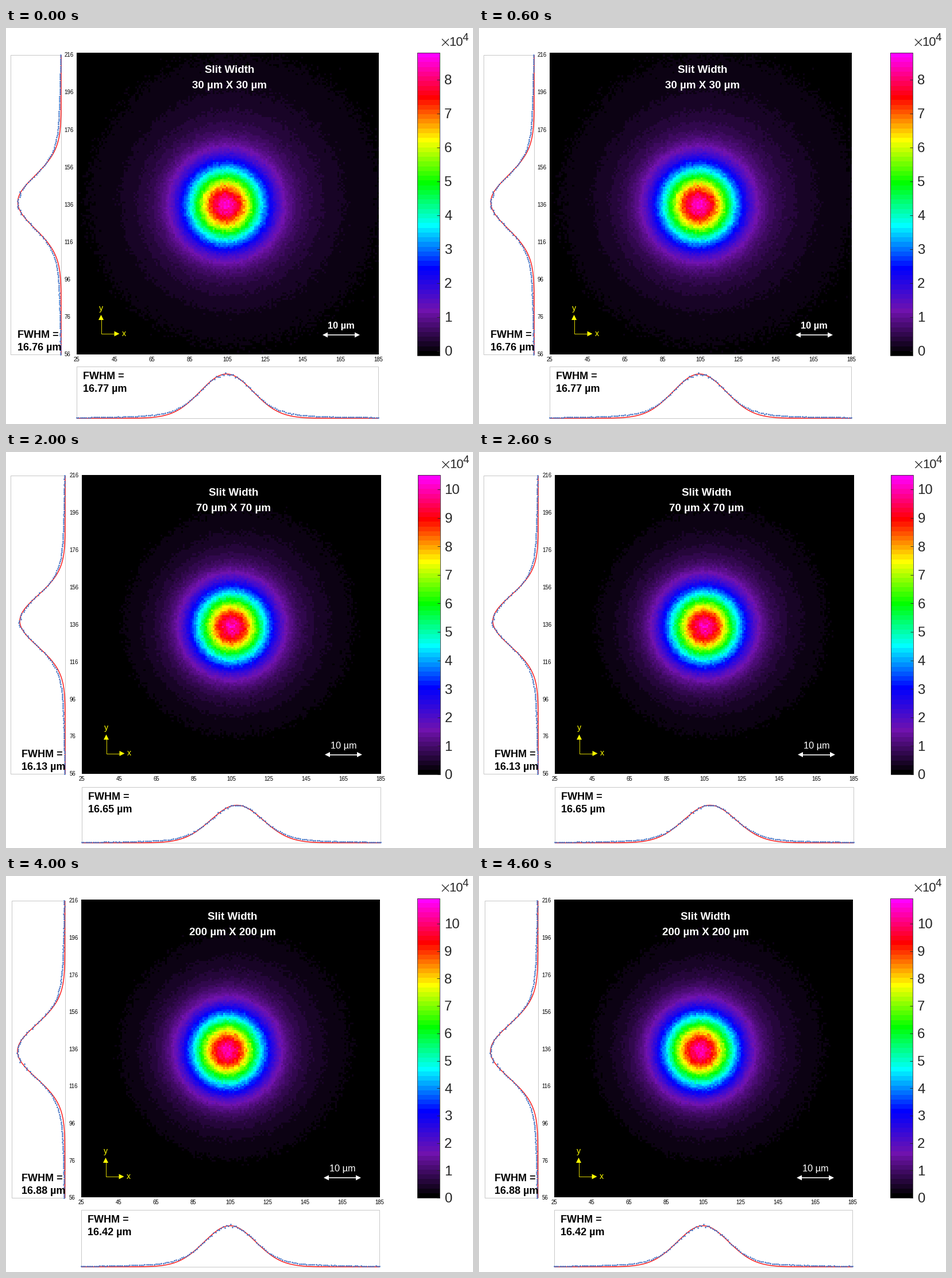
A matplotlib script that plays this animation: 813 by 689 pixels, repeating every 5 s.

```python
import numpy as np
import matplotlib.pyplot as plt
from matplotlib.animation import FuncAnimation
from matplotlib.colors import LinearSegmentedColormap
from matplotlib.patches import Polygon, Rectangle

W, H, DPI = 813, 689, 100
PT = 72 / DPI
UM = 6.45  # screen pixels per micrometre

BEAM = LinearSegmentedColormap.from_list(
    "beam",
    ["#000000", "#7012ae", "#0000ff", "#00ffff",
     "#00ff00", "#ffff00", "#ff0000", "#ff00ff"], N=64)

# heat, side: x0, x1, y0, y1; foot: y0, y1; peaks: position, tip
# bar: x0, y0, y1; scale: y of zero, pixels per unit, last tick, step
SCENES = [
    dict(slit=30, heat=(123, 648, 43, 568), side=(8, 96, 47, 568), foot=(589, 679),
         spot=(382, 308, 47), fy=16.76, ypeak=(303, 20.5), fx=16.77, xpeak=(384, 602),
         bar=(716, 43, 570), scale=(562, 59.06, 8, 1)),
    dict(slit=50, heat=(127, 651, 41, 565), side=(6, 98, 42, 564), foot=(587, 681),
         spot=(389, 305.5, 45), fy=16.40, ypeak=(292, 26), fx=16.92, xpeak=(388, 623.5),
         bar=(718, 41, 567), scale=(567, 54.2, 9, 1)),
    dict(slit=70, heat=(132, 652, 41, 560.5), side=(8, 103, 41, 560), foot=(583, 680),
         spot=(392, 305, 45), fy=16.13, ypeak=(294, 24), fx=16.65, xpeak=(402, 614.5),
         bar=(716.5, 40, 561), scale=(561, 49.6, 10, 1)),
    dict(slit=100, heat=(131.5, 652.5, 41, 561), side=(7.5, 102.5, 42, 560), foot=(583, 680),
         spot=(391, 304.5, 45), fy=16.05, ypeak=(302, 19), fx=16.34, xpeak=(397, 610),
         bar=(718.5, 40, 562), scale=(562, 46.95, 10, 2)),
    dict(slit=200, heat=(131, 650, 41, 559), side=(10, 102.5, 43, 560), foot=(581, 680),
         spot=(385, 304, 45), fy=16.88, ypeak=(305, 20), fx=16.42, xpeak=(390, 608.5),
         bar=(716, 39, 560), scale=(560, 47.7, 10, 1)),
]

fig = plt.figure(figsize=(W / DPI, H / DPI), dpi=DPI, facecolor="white")
ax = fig.add_axes([0, 0, 1, 1])


def text(x, y, s, size, color="black", bold=False, ha="left"):
    """Write s with the middle of its capitals at y."""
    ax.text(x, y + 0.35 * size, s, fontsize=size * PT, color=color, ha=ha,
            va="baseline", family="Liberation Sans",
            weight="bold" if bold else "normal", zorder=6)


def line(xs, ys, color, width, z=3):
    ax.plot(xs, ys, color=color, lw=width * PT, zorder=z, solid_capstyle="butt")


def head(x, y, dx, dy, color, size=9):
    """Arrow head with its tip at (x, y), pointing along (dx, dy)."""
    bx, by, h = x - dx * size, y - dy * size, size / 2
    ax.add_patch(Polygon([(x, y), (bx - dy * h, by + dx * h), (bx + dy * h, by - dx * h)],
                         fc=color, ec="none", zorder=5))


def frame_box(x0, x1, y0, y1, color, width):
    ax.add_patch(Rectangle((x0, y0), x1 - x0, y1 - y0, fill=False,
                           ec=color, lw=width * PT, zorder=2))


def beam(u, tail, power):
    return (1 - tail) * np.exp(-0.575 * u**2) + tail / (1 + (u / 2.2)**2)**power


def heatmap(sc, rng):
    x0, x1, y0, y1 = sc["heat"]
    cx, cy, sigma = sc["spot"]
    mid = (np.arange(160) + 0.5) / 160
    x, y = np.meshgrid(x0 + mid * (x1 - x0), y0 + mid * (y1 - y0))
    v = beam(np.hypot(x - cx, y - cy) / sigma, 0.26, 1.6)
    v += 0.025 * np.exp(-((x - cx - 50)**2 + (y - cy + 30)**2) / (2 * 140**2))
    v *= 0.94
    v += rng.normal(0, 1, v.shape) * (0.0025 + 0.016 * np.sqrt(v))* np.minimum(1, 0.35 + v * 2)
    if sc["slit"] > 30:
        v -= 0.012
    ax.imshow(v, cmap=BEAM, vmin=0, vmax=1, extent=(x0, x1, y1, y0),
              aspect="auto", interpolation="nearest", zorder=1)


def profile(pos, peak, base, tip, fwhm, rng):
    """Heights of the fitted curve and of the measured points."""
    sigma = fwhm * UM / 2.355
    span = np.linspace(pos[0], pos[1], 400)
    fit = base + (tip - base) * np.exp(-((span - peak) / sigma)**2 / 2)
    dots = np.linspace(pos[0], pos[1], 161)
    v = beam((dots - peak) / sigma, 0.22, 1.3)
    v += rng.normal(0, 1, v.size) * (0.002 + 0.014 * v)
    return span, fit, dots, base + (tip - base) * v


def scatter(xs, ys):
    ax.plot(xs, ys, "o", ms=2.7 * PT, mfc="#4472c4", mec="none", zorder=4)


def profiles(sc, rng):
    hx0, hx1 = sc["heat"][:2]
    x0, x1, y0, y1 = sc["side"]
    frame_box(x0, x1, y0, y1, "#c8c8c8", 1)
    peak, tip = sc["ypeak"]
    span, fit, dots, vals = profile((y0, y1), peak, x1, tip, sc["fy"], rng)
    line(fit, span, "#ff1010", 1.4)
    scatter(vals, dots)
    text(x1 - 76, y1 - 35, "FWHM =", 18, bold=True)
    text(x1 - 76, y1 - 13.5, f"{sc['fy']:.2f} µm", 18, bold=True)

    top, base = sc["foot"]
    frame_box(hx0, hx1, top, base, "#c8c8c8", 1)
    peak, tip = sc["xpeak"]
    span, fit, dots, vals = profile((hx0, hx1), peak, base, tip, sc["fx"], rng)
    line(span, fit, "#ff1010", 1.4)
    scatter(dots, vals)
    text(hx0 + 10.5, top + 16, "FWHM =", 18, bold=True)
    text(hx0 + 10.5, top + 38, f"{sc['fx']:.2f} µm", 18, bold=True)


def labels(sc):
    x0, x1, y0, y1 = sc["heat"]
    sy0, sy1 = sc["side"][2:]
    for k in range(9):
        text(x0 - 21.5, sy0 + k * (sy1 - sy0) / 8, str(216 - 20 * k), 9.6)
        text(x0 + k * (x1 - x0) / 8, y1 + 8.5, str(25 + 20 * k), 9.6, ha="center")

    mid, slit = (x0 + x1) / 2 + 3.7, sc["slit"]
    text(mid, y0 + 28.5, "Slit Width", 18.8, "white", True, "center")
    text(mid, y0 + 55, f"{slit} µm X {slit} µm", 18.8, "white", True, "center")

    ox, oy = x0 + 42.5, y1 - 36
    line([ox, ox, ox + 26], [oy - 26, oy, oy], "#d8d000", 1)
    head(ox, oy - 33, 0, -1, "#ffff00")
    head(ox + 32, oy, 1, 0, "#ffff00")
    text(ox, oy - 45, "y", 14, "#ffff00", ha="center")
    text(ox + 40, oy - 1, "x", 14, "#ffff00", ha="center")

    cx, ay = x1 - 64.5, y1 - 34
    line([cx - 28, cx + 28], [ay, ay], "white", 1.6)
    head(cx - 32.5, ay, -1, 0, "white")
    head(cx + 32.5, ay, 1, 0, "white")
    text(cx, y1 - 50.5, "10 µm", 16.4, "white", slit == 30, "center")


def colorbar(sc):
    x0, y0, y1 = sc["bar"]
    x1 = x0 + 39
    ax.imshow(np.linspace(1, 0, 64)[:, None], cmap=BEAM, vmin=0, vmax=1,
              extent=(x0, x1, y1, y0), aspect="auto", interpolation="nearest", zorder=1)
    frame_box(x0, x1, y0, y1, "#262626", 0.8)
    zero, unit, last, step = sc["scale"]
    ink = "#262626"
    for n in range(0, last + 1, step):
        y = zero - n * unit
        line([x1 - 5, x1], [y, y], ink, 0.9)
        text(x0 + 47, y, str(n), 24, ink)
    cross_x, cross_y, r = x0 + 49, y0 - 18, 6
    for s in (-1, 1):
        line([cross_x - r, cross_x + r], [cross_y - s * r, cross_y + s * r], ink, 1.3)
    text(x0 + 68, y0 - 19.5, "10", 22, ink, ha="center")
    text(x0 + 84, y0 - 28, "4", 19, ink, ha="center")


def draw(i):
    sc, rng = SCENES[i], np.random.default_rng(40 + i)
    ax.clear()
    ax.axis("off")
    heatmap(sc, rng)
    profiles(sc, rng)
    labels(sc)
    colorbar(sc)
    ax.set_xlim(0, W)
    ax.set_ylim(H, 0)
    return []


anim = FuncAnimation(fig, draw, frames=len(SCENES), interval=1000,
                     repeat=True, repeat_delay=0, blit=False)
plt.show()
```
